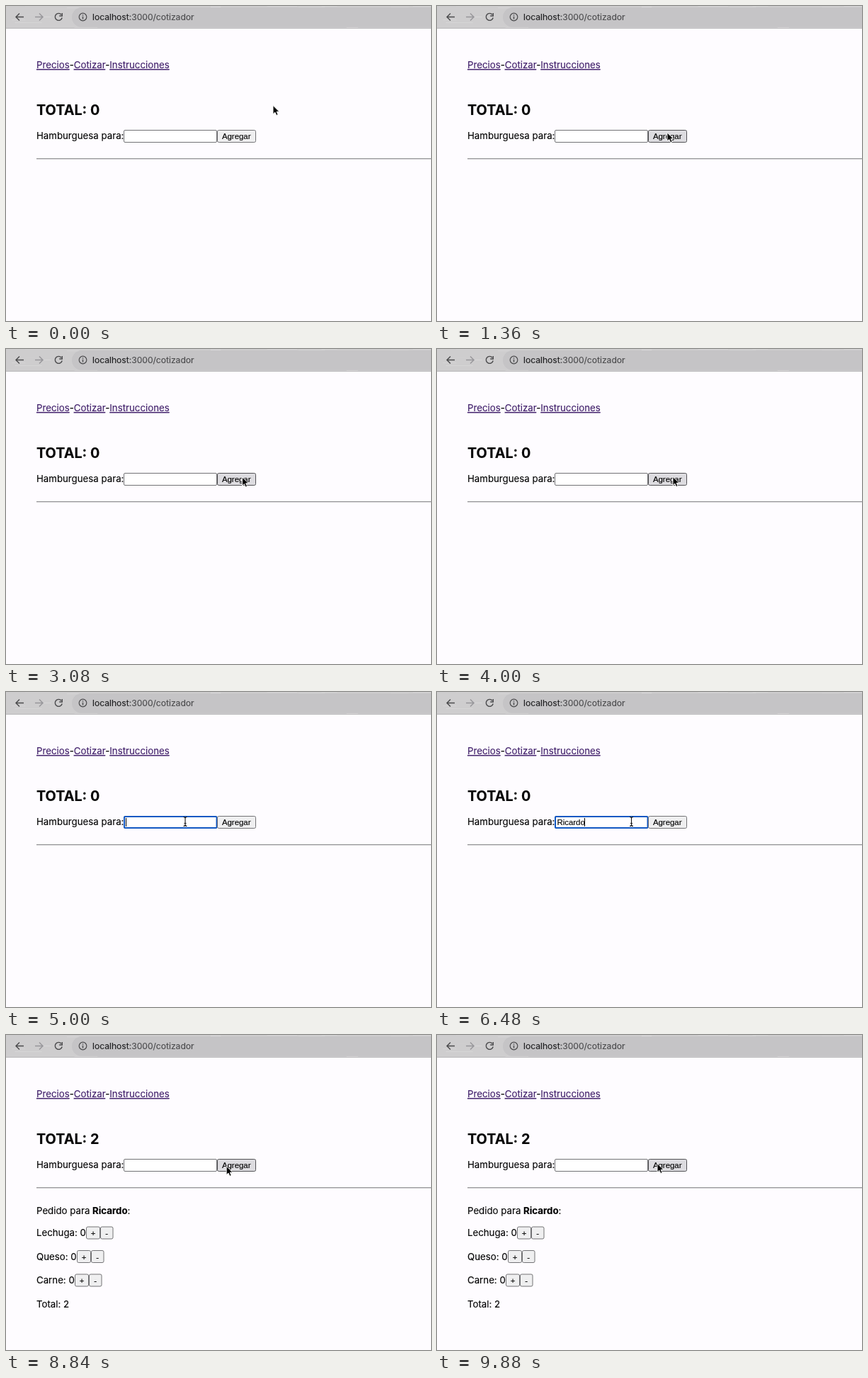
An HTML page that plays this animation: 600 by 445 pixels, repeating every 10 s.

```html
<!DOCTYPE html>
<html lang="es">
<head>
<meta charset="utf-8">
<style>
  html, body { margin: 0; width: 100%; height: 100%; overflow: hidden; background: #fefcff; }
  svg { display: block; }
  text { font: 13.25px Inter, sans-serif; color: #050505; white-space: pre; }
  text, tspan { fill: currentColor; stroke: currentColor; stroke-width: .15; }
  .link { color: #41206b; text-decoration: underline; }
  .title { font-size: 19.8px; font-weight: 700; }
  .url { font-size: 12.1px; color: #4c4c4e; }
  .host { color: #222224; }
  .control { font: 11.4px "Liberation Sans", Arial, sans-serif; }
  .box { fill: #efeff0; stroke: #727275; }
  .icon { fill: none; stroke: #4b4b4d; stroke-width: 1.4; }
</style>
</head>
<body>
<svg width="600" height="445" viewBox="0 0 600 445">
  <rect width="600" height="31" fill="#cecdce"/>
  <g id="metal" stroke="#fff"></g>
  <rect x="93" y="2" width="530" height="28" rx="14" fill="#c5c4c6"/>
  <path d="M0 31.5H600" stroke="#b9b8ba"/>
  <path class="icon" d="M25 15.5H14M19 10.5L14 15.5L19 20.5"/>
  <path class="icon" d="M41 15.5H52M47 10.5L52 15.5L47 20.5" style="stroke:#97969a"/>
  <path class="icon" d="M78.2 12.2A5 5 0 1 0 79.2 16.5M79.3 10V14H75.2"/>
  <circle class="icon" cx="108.5" cy="15.5" r="5.3" style="stroke-width:1.2"/>
  <path class="icon" d="M108.5 14.8V18.4M108.5 12.2V13.6"/>
  <text class="url" x="122" y="20"><tspan class="host">localhost</tspan>:3000/cotizador</text>

  <text x="43" y="88"><tspan class="link">Precios</tspan>-<tspan class="link">Cotizar</tspan>-<tspan class="link">Instrucciones</tspan></text>
  <text class="title" id="total" x="43" y="153.5"></text>
  <text x="43" y="188">Hamburguesa para:</text>
  <rect class="box" x="166.5" y="175.5" width="131" height="17" rx="1.5" style="fill:#fff"/>
  <rect id="ring" x="167" y="176" width="130.5" height="16" rx="1.5" fill="none" stroke="#1259c3" stroke-width="2"/>
  <text class="control" id="typed" x="169.5" y="188"></text>
  <path id="caret" d="M.5 178V190" stroke="#000"/>
  <rect class="box" id="add" x="298.5" y="175.5" width="54" height="17" rx="2"/>
  <text class="control" x="325.2" y="188" text-anchor="middle">Agregar</text>
  <path d="M43 215.5H600" stroke="#98989a"/>
  <path d="M43 216.5H600" stroke="#d6d4d7"/>

  <g id="order">
    <text x="43" y="252.5">Pedido para <tspan font-weight="700">Ricardo</tspan>:</text>
    <text x="43" y="384.5">Total: 2</text>
  </g>
  <path id="arrow" d="M0 0V12.2L2.8 9.6L4.8 14L7 13.1L5.1 8.8H8.8Z" fill="#000" stroke="#fff" stroke-width=".9"/>
  <path id="beam" d="M-2.5 -6.5Q0 -6.5 0 -4.5V4.5Q0 6.5 -2.5 6.5M2.5 -6.5Q0 -6.5 0 -4.5M0 4.5Q0 6.5 2.5 6.5M-1.5 2.5H1.5" fill="none" stroke="#111" stroke-width="1.1"/>
</svg>
<script>
const LOOP = 10000, STEP = 40, NAME = "Ricardo";
const [metal, total, ring, typed, caret, add, order, arrow, beam] =
  ["metal", "total", "ring", "typed", "caret", "add", "order", "arrow", "beam"].map(id => document.getElementById(id));

// Pointer moves; it rests in between
const moves = [
  { from: 0, to: 40, x: 324, y: 136 },
  { from: 320, to: 1000, x: 325, y: 181 },
  { from: 1320, to: 1480, x: 325, y: 149 },
  { from: 1640, to: 2200, x: 328, y: 178 },
  { from: 2360, to: 2520, x: 380, y: 178 },
  { from: 2680, to: 3080, x: 333.5, y: 181 },
  { from: 3400, to: 3680, x: 333, y: 164 },
  { from: 3680, to: 4000, x: 333, y: 180.5 },
  { from: 4160, to: 4560, x: 253, y: 183 },
  { from: 6440, to: 6480, x: 274.5, y: 183 },
  { from: 6480, to: 7120, x: 311.5, y: 182 },
  { from: 8440, to: 9080, x: 311, y: 181.5 }
];
const within = (t, from, to) => t >= from && t < to;
const show = (node, on) => node.setAttribute("visibility", on ? "visible" : "hidden");

function pointerAt(t) {
  let x = 377, y = 140.5;
  for (const move of moves) {
    const p = Math.min(1, Math.max(0, (t - move.from) / (move.to - move.from)));
    const ease = p * p * (3 - 2 * p);
    x += (move.x - x) * ease;
    y += (move.y - y) * ease + 4 * Math.sin(Math.PI * p);
  }
  return [x, y];
}

// Letters come in bursts of three
function lettersAt(t) {
  return [...NAME].filter((_, i) => t >= 5120 + 360 * Math.floor((i + 2) / 3) + 80 * ((i + 2) % 3)).join("");
}

function addButton(x, y, width, sign) {
  order.insertAdjacentHTML("beforeend", `
    <rect class="box" x="${x + .5}" y="${y - 13}" width="${width - 1}" height="17" rx="2"/>
    <text class="control" x="${x + width / 2}" y="${y}" text-anchor="middle">${sign}</text>`);
}

function addStepper(name, row) {
  const y = 284 + 33.5 * row;
  order.insertAdjacentHTML("beforeend", `<text x="43" y="${y}">${name}: 0</text>`);
  const x = Math.round(43 + order.lastElementChild.getComputedTextLength());
  addButton(x, y, 20, "+");
  addButton(x + 20, y, 18.5, "-");
}

function brushMetal() {
  let seed = 7;
  const random = () => (seed = seed * 16807 % 2147483647) / 2147483647;
  for (let i = 0; i < 90; i++) {
    const x = random() * 620 - 20, y = Math.floor(random() * 31) + .5;
    metal.insertAdjacentHTML("beforeend",
      `<path d="M${x} ${y}h${10 + random() * 40}" opacity="${random() * .25}"/>`);
  }
}

function draw(now) {
  const t = Math.floor(now % LOOP / STEP) * STEP;
  const [x, y] = pointerAt(t);
  const ordered = t >= 6960, focused = within(t, 4520, 6920);
  const inRow = y >= 175 && y <= 193;
  const overField = inRow && x > 166 && x < 298;
  const overButton = inRow && x >= 298 && x < 353;
  const pressed = within(t, 6920, 6960) || within(t, 8680, 8760);
  const typing = within(t, 5240, 6480);

  total.textContent = "TOTAL: " + (ordered ? 2 : 0);
  typed.textContent = ordered ? "" : lettersAt(t);
  caret.setAttribute("transform", `translate(${Math.round(169 + typed.getComputedTextLength())})`);
  show(caret, focused && !within(t, 4840, 5000));
  show(ring, focused);
  show(order, ordered);
  add.style.fill = pressed ? "#f5f5f5" : overButton ? "#dddce0" : "";
  add.style.stroke = overButton ? "#505053" : "";

  show(arrow, !typing && !overField);
  show(beam, !typing && overField);
  for (const cursor of [arrow, beam]) cursor.setAttribute("transform", `translate(${x} ${y})`);
}

brushMetal();
["Lechuga", "Queso", "Carne"].forEach(addStepper);

const start = performance.now();
function tick() {
  draw(performance.now() - start);
  requestAnimationFrame(tick);
}
tick();
</script>
</body>
</html>
```
